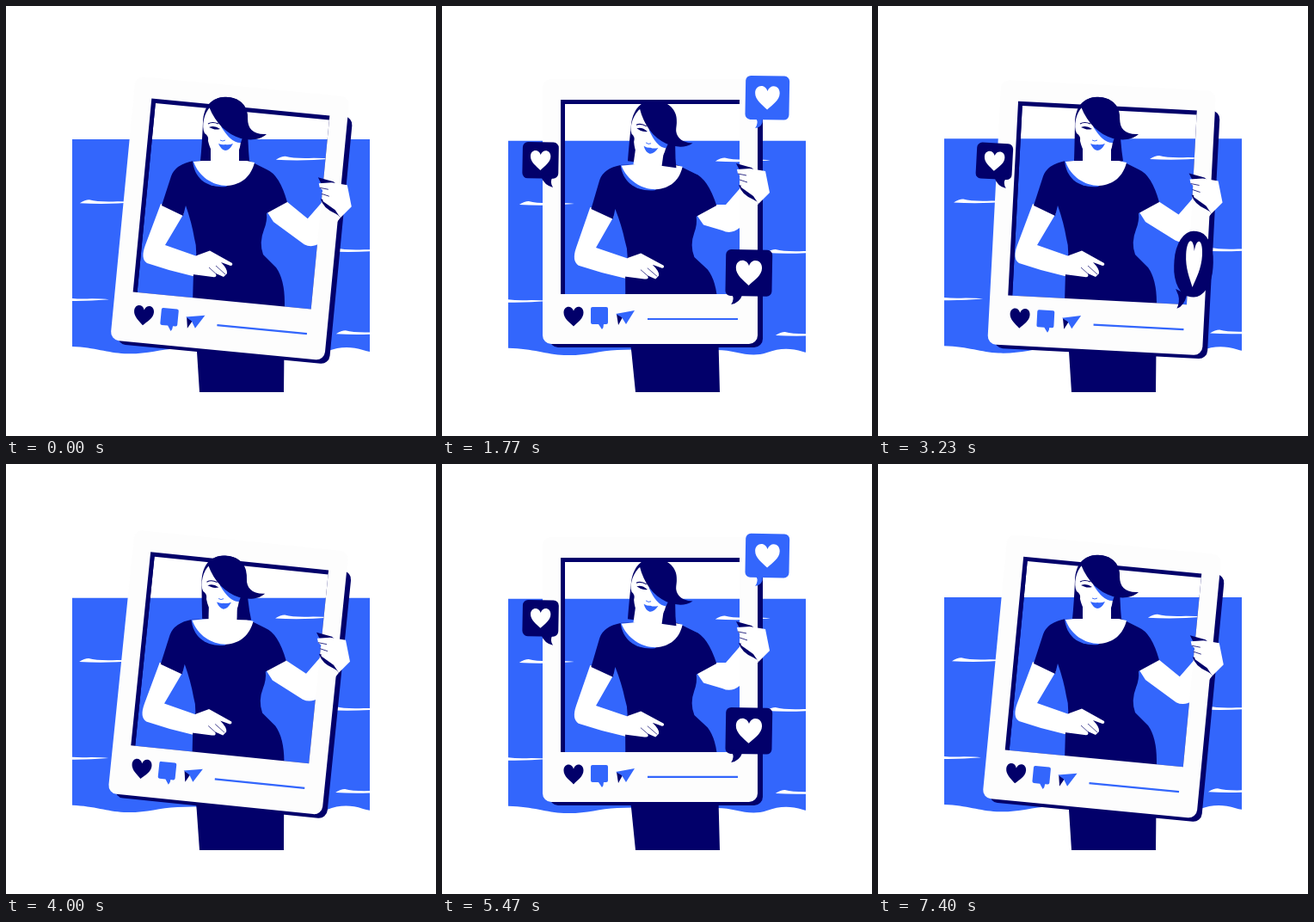
Animation of 500x500 px, one loop 7.43 s. Source, as an HTML page with a canvas:

```html
<!DOCTYPE html>
<html lang="en">
<head>
<meta charset="utf-8">
<title>Sharing a summer portrait</title>
<style>
html, body { margin: 0; width: 100%; height: 100%; overflow: hidden; background: #fff; }
canvas { display: block; width: 500px; height: 500px; }
</style>
</head>
<body>
<canvas id="stage"></canvas>
<script>
const BLUE = '#3366fc', NAVY = '#02006a', WHITE = '#fff', CARD = '#fdfdfd';
const CYCLE = 3715;
const canvas = document.getElementById('stage');
const ctx = canvas.getContext('2d');
const dpr = window.devicePixelRatio || 1;
canvas.width = canvas.height = 500 * dpr;

const times = [0, 830, 915, 1770, 2615, 3230];
const tracks = {
  x: track([262, 251.5, 249.5, 242, 250, 261]),
  y: track([230, 213, 213, 222, 225.5, 229]),
  turn: track([5.5, 6.1, 6, 0, 0.4, 3]),
  lean: track([0, 0.85, 0.95, 1, 0.25, 0]),
  hair: track([0, 17, 15, 5, 6, 2]),
  wobble: track([0, 0, 0, 1, -4, 0])
};

// Periodic cubic through the keys, flat at every extreme.
function track(values) {
  const n = values.length;
  const at = i => times[(i + n) % n] + Math.floor(i / n) * CYCLE;
  const val = i => values[(i + n) % n];
  const rise = i => (val(i + 1) - val(i)) / (at(i + 1) - at(i));
  const slope = i => {
    const a = rise(i - 1), b = rise(i);
    return a * b <= 0 ? 0 : 2 * a * b / (a + b);
  };
  return t => {
    let i = n - 1;
    while (times[i] > t) i--;
    const d = at(i + 1) - at(i), u = (t - at(i)) / d, v = 1 - u;
    return v * v * (1 + 2 * u) * val(i) + u * u * (3 - 2 * u) * val(i + 1)
      + d * u * v * (v * slope(i) - u * slope(i + 1));
  };
}

const rad = deg => deg * Math.PI / 180;
const clamp = v => Math.max(0, Math.min(1, v));
const ease = v => { v = clamp(v); return v * v * (3 - 2 * v); };
const wave = (t, peak) => Math.cos(2 * Math.PI * (t - peak) / CYCLE);

function fill(path, color, rule) {
  ctx.fillStyle = color;
  ctx.fill(typeof path === 'string' ? new Path2D(path) : path, rule || 'nonzero');
}
function line(path, color, width) {
  ctx.strokeStyle = color;
  ctx.lineWidth = width;
  ctx.stroke(new Path2D(path));
}
function group(draw) {
  ctx.save();
  draw();
  ctx.restore();
}
function toCard(p) {
  ctx.translate(p.x, p.y);
  ctx.rotate(rad(p.turn));
}
function onCard(p, x, y) {
  const c = Math.cos(rad(p.turn)), s = Math.sin(rad(p.turn));
  return [p.x + x * c - y * s, p.y + x * s + y * c];
}
function heart(x, y, w, h, color) {
  group(() => {
    ctx.translate(x, y);
    ctx.scale(w, h);
    fill('M0 .5C-.2 .3 -.5 .1 -.5 -.2C-.5 -.55 -.1 -.6 0 -.28C.1 -.6 .5 -.55 .5 -.2C.5 .1 .2 .3 0 .5Z', color);
  });
}

const foam = 'M0 2Q6 -2 11 -2Q22 1 44 0Q56 0 64 1Q30 4 0 2Z';
const foamSpots = [[88, 228], [316, 177.5], [375, 284], [58, 341], [386, 380]];

function sea(t) {
  const dx = -3 * wave(t, 450), dy = 1.5 * wave(t, 1250);
  group(() => {
    ctx.beginPath();
    ctx.rect(77, 100, 346, 350);
    ctx.clip();
    ctx.translate(dx, dy);
    fill('M60 155.8H440V404Q428 404 418 401C402 396 390 397 376 402C355 409 340 399 318 399'
      + 'C270 399 240 398 202 399C180 400 165 406 140 405C116 404 100 395 60 397Z', BLUE);
    for (const [x, y] of foamSpots) {
      group(() => { ctx.translate(x, y); fill(foam, WHITE); });
    }
  });
}

function cardBack(p) {
  group(() => {
    toCard(p);
    const back = new Path2D();
    back.roundRect(-117, -114, 248, 289, 10);
    back.rect(-99, -109, 203, 222);
    fill(back, NAVY, 'evenodd');
    fill('M-104 -113H104V-108H-99V113H-104Z', NAVY);
  });
}

function cardFront(p) {
  group(() => {
    toCard(p);
    const front = new Path2D();
    front.roundRect(-125, -137, 250, 308, 10);
    front.rect(-104, -113, 208, 226);
    fill(front, CARD, 'evenodd');
    heart(-89, 139, 23, 23, NAVY);
    fill('M-67 128H-51Q-49 128 -49 130V146Q-49 148 -51 148H-54Q-54 152 -56 154Q-58 151 -60 148H-67Q-69 148 -69 146V130Q-69 128 -67 128Z', BLUE);
    fill('M-39 136L-32 140L-37 149Z', NAVY);
    fill('M-18 132L-40 136L-33 140L-28 148Z', BLUE);
    line('M-3 142H102', BLUE, 2.2);
  });
}

// The body leans and sinks a little about the hem.
const bodyPoint = (p, x, y) => [
  x - 0.035 * p.lean * (449 - y),
  449 - (449 - y) * (1 - 0.018 * p.lean)
];

function body(p) {
  group(() => {
    const k = 0.035 * p.lean, d = 1 - 0.018 * p.lean;
    ctx.transform(1, 0, k, d, -449 * k, 449 * (1 - d));
    fill('M180 230L162 278Q156 294 164 299Q190 308 217 314L230 313L250 317L257 312L256 306L263 300'
      + 'L237 285L222 291L185 278L207 241Z', WHITE);
    fill('M218 180Q197 184 192 198L181 232L206 244L209 232Q216 252 219 270Q224 286 218 309L217 345'
      + 'L222 402L225 449H323L324 345Q324 318 314 304L299 289Q294 275 300 260Q304 250 303 241L327 228'
      + 'Q318 196 303 190L283 180Z', NAVY);
    fill('M217 180C219 201 234 212 256 210L286 184Z', BLUE);
    fill('M238 165V179L218 181C224 198 240 209 257 209C274 208 285 198 289 182L271 178V165Z', WHITE);
    fill('M217 293L222 290L237 284.5L263 299Q264 302 261 302L250 298Q258 306 257 311L253 315L244 311'
      + 'Q246 316 240 315L217 312Z', WHITE);
    line('M244 302L255 312M236 304L247 314', NAVY, 0.7);
  });
}

const gripPoint = p => {
  const [x, y] = onCard(p, 120, -14);
  return [x, y - 0.6 * p.turn * (1 - p.lean)];
};

function farArm(p) {
  const [x, y] = gripPoint(p);
  const arm = new Path2D();
  arm.moveTo(...bodyPoint(p, 326, 227));
  arm.lineTo(x - 32, y + 23);
  arm.lineTo(x - 12, y);
  arm.lineTo(x + 6, y + 22);
  arm.lineTo(x - 16, y + 50);
  arm.quadraticCurveTo(x - 26, y + 58, x - 36, y + 53);
  arm.lineTo(...bodyPoint(p, 311, 251));
  arm.lineTo(...bodyPoint(p, 304, 240));
  fill(arm, WHITE);
}

function hand(p) {
  const [x, y] = gripPoint(p);
  group(() => {
    ctx.translate(x, y);
    fill('M-20 -25L-2 -20L5 -14L-16 -17Z', NAVY);
    fill('M-17 0L-2 4L5 20L0 17Q-14 11 -17 0Z', NAVY);
    fill('M-19 -18L-4 -19L14 -16L19 9L6 22L0 13L-14 3Q-16 0 -11 0L-15 -5Q-17 -8 -12 -8L-18 -13Z', WHITE);
    line('M-18 -13L-8 -11M-16 -6L-7 -3', NAVY, 0.8);
  });
}

function head(p) {
  group(() => {
    ctx.translate(255 - 9 * p.lean, 135 + 4 * p.lean);
    ctx.rotate(rad(8 * p.lean));
    ctx.translate(-255, -135);
    const h = p.hair;
    fill(`M256 106C238 106 230 117 229 135Q${228 + h / 3} 160 ${226 + h} 180L${283 + h} 180`
      + `Q${281 + h / 3} 160 281 128Q276 106 256 106Z`, NAVY);
    fill('M238 160V183Q255 186 271 181V160Z', WHITE);
    fill('M238 117C230 124 227 140 231 148Q236 151 235 157Q237 166 241 171Q249 179 256 179'
      + 'C267 178 273 169 273 155L262 132Z', WHITE);
    fill('M250 140Q262 160 273 159L276 150Z', BLUE);
    fill('M236 117C241 107 250 105 258 106C273 107 282 117 281 131C281 143 288 150 303 149'
      + 'C294 157 282 156 273 154C257 149 244 137 236 117Z', NAVY);
    line('M235 137Q240 134 247 137', NAVY, 1.1);
    fill('M236 141Q242 138 249 143Q244 144 241 143Z', NAVY);
    line('M249 156L252 157L255 156', BLUE, 0.9);
    fill('M247 160Q252 162 255 161Q259 162 264 160Q260 168 255 168Q250 167 247 160Z', BLUE);
  });
}

// x, y: tail tip on the card; side 1 puts the tail at the left, -1 at the right.
const bubbles = [
  { x: 122, y: -80, w: 51, inset: 13, side: 1, color: BLUE, start: 796, end: 3200 },
  { x: 94, y: 125, w: 54, inset: 8, side: 1, color: NAVY, start: 960, end: 3380 },
  { x: -114, y: -11, w: 42, inset: 7, side: -1, color: NAVY, start: 1110, end: 3560 }
];

function bubble(p, t, b) {
  const age = t - b.start, left = b.end - t;
  if (age <= 0 || left <= 0) return;
  const size = Math.min(clamp(age / 120), clamp(left / 130));
  const settle = age < 120 ? 1 : Math.exp(-(age - 120) / 130) * Math.cos((age - 120) / 85);
  const stretch = left < 310 ? ease((310 - left) / 160) : settle;
  const round = clamp(stretch);
  const [x, y] = onCard(p, b.x, b.y);
  const nudge = b.side > 0 ? 1.2 * p.wobble : 0;
  const { w } = b;
  group(() => {
    ctx.translate(x + nudge, y - 7 * round);
    ctx.rotate(rad(p.turn + p.wobble));
    ctx.scale(size * b.side * (1 - 0.16 * stretch), size * (1 + 0.42 * stretch));
    const shape = new Path2D();
    shape.roundRect(-b.inset, -w - 10, w, w, 6 + (w / 2 - 8) * round);
    fill(shape, b.color);
    fill(`M${4 - b.inset} -16L${20 - b.inset} -12Q9 -2 -1 0Q3 -6 0 -11Z`, b.color);
    heart(w / 2 - b.inset, -w / 2 - 10, w * 0.56 * (1 - 0.26 * round), w * 0.54 * (1 + 0.3 * round), WHITE);
  });
}

function draw(t) {
  const p = {};
  for (const key in tracks) p[key] = tracks[key](t);
  ctx.setTransform(dpr, 0, 0, dpr, 0, 0);
  ctx.fillStyle = WHITE;
  ctx.fillRect(0, 0, 500, 500);
  sea(t);
  cardBack(p);
  farArm(p);
  body(p);
  cardFront(p);
  head(p);
  hand(p);
  for (const b of bubbles) bubble(p, t, b);
}

const begin = performance.now();
function tick() {
  draw((performance.now() - begin) % CYCLE);
  requestAnimationFrame(tick);
}
tick();
</script>
</body>
</html>
```
